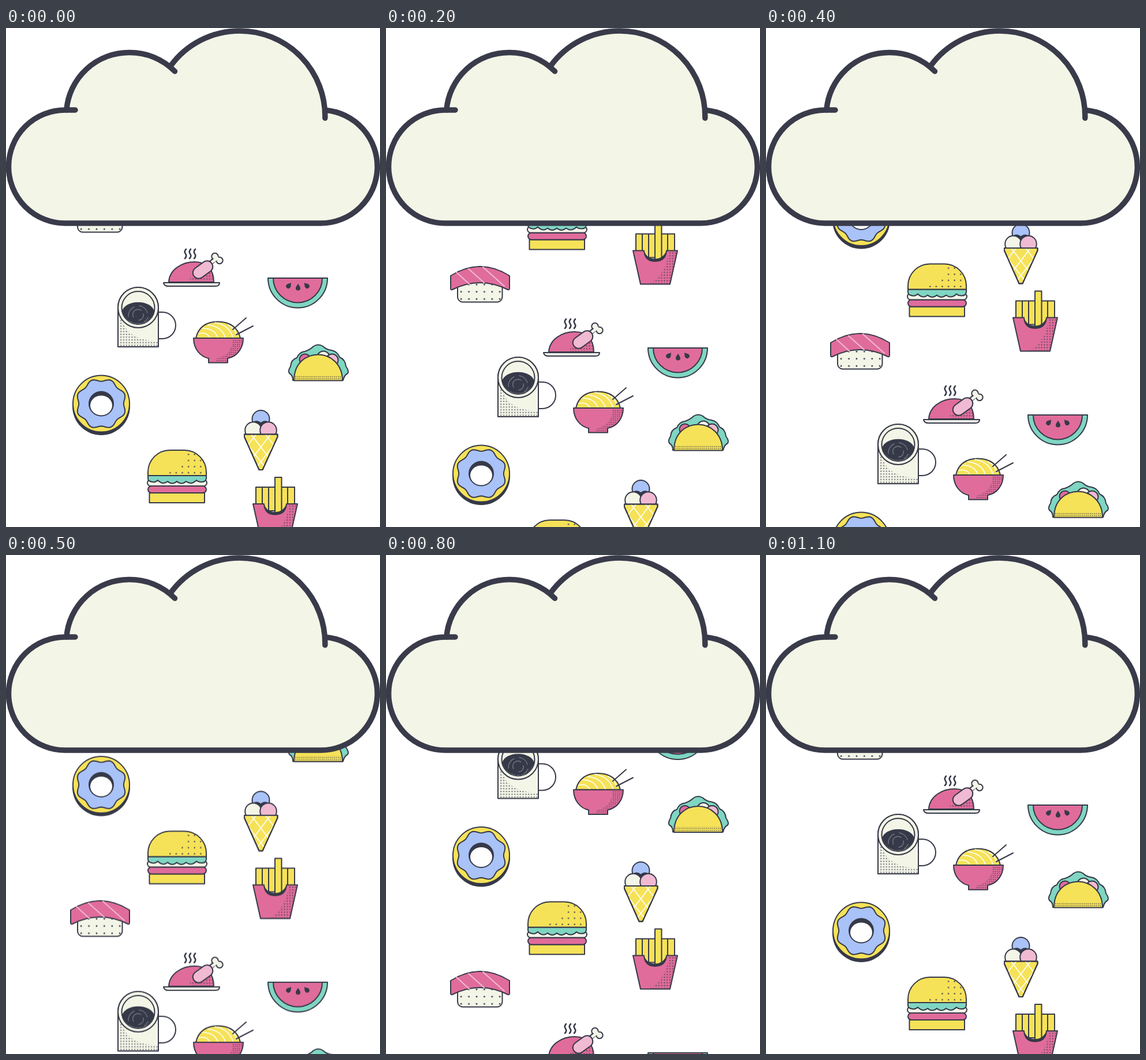
Animation of 648x864 px, one loop 1200 ms. Source, as an HTML page:

```html
<!DOCTYPE html>
<html lang="en">
<head>
<meta charset="utf-8">
<title>Food rain</title>
<style>
  html, body { margin: 0; width: 100%; height: 100%; overflow: hidden; background: #fff; }
  svg { display: block; width: 648px; height: 864px; }
  .item { stroke: #363948; stroke-width: 2; stroke-linejoin: round; stroke-linecap: round; fill: none; }
  .pink { fill: #e06c9b; }
  .rose { fill: #f0bad2; }
  .yellow { fill: #f6e258; }
  .mint { fill: #7fd6c2; }
  .blue { fill: #a9c2f8; }
  .cream { fill: #f3f5e7; }
  .ink { fill: #363948; }
  .white { stroke: #fff; stroke-width: 1.6; }
  .stripe { stroke: #f0bad2; }
  .swirl { stroke: #737582; stroke-width: 1.4; }
  .steam { stroke-width: 2.6; }
  .bone { stroke-width: 8; }
  .marrow { stroke: #f3f5e7; stroke-width: 5; }
  .bare { stroke: none; }
  .fine { fill: url(#fine); stroke: none; }
  .small { fill: url(#small); stroke: none; }
  #rain { animation: fall 1.2s step-end infinite; }
  @keyframes fall {
    0% { transform: translateY(0); }
    8.33% { transform: translateY(74px); }
    16.66% { transform: translateY(121px); }
    25% { transform: translateY(168.7px); }
    33.33% { transform: translateY(237px); }
    41.66% { transform: translateY(306.7px); }
    50% { transform: translateY(342px); }
    58.33% { transform: translateY(377.5px); }
    66.66% { transform: translateY(429px); }
    75% { transform: translateY(481.3px); }
    83.33% { transform: translateY(520px); }
    91.66%, 100% { transform: translateY(0); }
  }
</style>
</head>
<body>
<svg viewBox="0 0 648 864">
  <defs>
    <clipPath id="below"><rect y="240" width="648" height="624"/></clipPath>
    <pattern id="fine" width="3.5" height="3.5" patternUnits="userSpaceOnUse">
      <circle class="ink" cx="1.75" cy="1.75" r=".8"/>
    </pattern>
    <pattern id="small" width="4.8" height="4.8" patternUnits="userSpaceOnUse">
      <circle class="ink" cx="2.4" cy="2.4" r="1"/>
    </pattern>
    <pattern id="seeds" x="279" y="733" width="10.6" height="10.6" patternUnits="userSpaceOnUse">
      <circle class="ink" cx="5.3" cy="5.3" r="1.2"/>
    </pattern>
    <pattern id="grains" x="123.5" y="391" width="13.4" height="12.5" patternUnits="userSpaceOnUse">
      <circle class="ink" cx="6.7" cy="6.2" r="1.4"/>
    </pattern>
    <path id="seed" d="M0-6C1-3 4-1 4 2A4 4 0 0 1-4 2C-4-1-1-3 0-6Z"/>
    <path id="cone" d="M413 703.5H470.5V708L444.5 765H438.5L413 708Z"/>
    <path id="lattice" d="M425 704L454 742M450 704L463 721M418 721L447 758"/>
  </defs>

  <g clip-path="url(#below)">
    <g id="rain">
      <g id="foods">
        <!-- sushi -->
        <g class="item" transform="translate(0 -74)">
          <rect class="cream" x="124" y="385" width="77.5" height="42.5" rx="9"/>
          <path fill="url(#grains)" class="bare" d="M125 391H201V427H125Z"/>
          <path class="pink" d="M112 382Q163 350 214 382V404Q214 407 211 406Q163 382 115 406Q112 407 112 404Z"/>
          <path class="stripe" d="M122 376L145 397M143 370L170 394M168 367L205 400"/>
        </g>

        <!-- roast -->
        <g class="item">
          <path class="pink" d="M282 440C283 418 305 405 327 405C350 405 360 420 360 440Z"/>
          <path class="small" d="M353 419L358 430V439H319V433L340 430Z"/>
          <path class="cream" d="M273 441H370Q370 447 363 447H281Q274 447 273 441Z"/>
          <path class="bone" d="M352 409L362 400"/>
          <circle class="cream" cx="362" cy="395.5" r="5.7"/>
          <circle class="cream" cx="370" cy="402.5" r="5.7"/>
          <path class="marrow" d="M352 409L366 398.5"/>
          <rect class="rose" x="322" y="408.5" width="38" height="20" rx="10" transform="rotate(-36 341 418.5)"/>
          <path class="steam" d="M312 383q-4 4-1 8t-1 8M320 383q-4 4-1 8t-1 8M328 383q-4 4-1 8t-1 8"/>
        </g>

        <!-- watermelon -->
        <g class="item">
          <path class="mint" d="M454 433H557A51.5 51.5 0 0 1 454 433Z"/>
          <path class="pink" d="M463 433H548A42.5 42.5 0 0 1 463 433Z"/>
          <g class="ink bare">
            <use href="#seed" transform="translate(490.5 445.5) rotate(40)"/>
            <use href="#seed" transform="translate(506 448.5)"/>
            <use href="#seed" transform="translate(520.5 445.5) rotate(-40)"/>
          </g>
        </g>

        <!-- coffee -->
        <g class="item">
          <path d="M264 492H271A23 23 0 0 1 271 538H264"/>
          <path class="cream" d="M194 552V484A35 35 0 0 1 264 484V552Z"/>
          <path class="small" d="M196 499H200Q206 541 263 542V551H196Z"/>
          <circle class="cream" cx="229" cy="484" r="35"/>
          <circle class="cream" cx="229" cy="484.5" r="28.5"/>
          <path class="ink bare" d="M201.3 490A28 18 0 0 1 256.7 490A28.5 28.5 0 0 1 201.3 490Z"/>
          <path class="swirl" d="M221 501A9 9 0 0 1 234 489M238 495A9 9 0 0 1 230 506M212 500A17 17 0 0 1 222 483M231 481A17 17 0 0 1 245 493M246 501A17 17 0 0 1 240 508"/>
        </g>

        <!-- noodles -->
        <g class="item">
          <path class="yellow" d="M329 537C333 518 347 508.5 367 508.5S402 518 406 537Z"/>
          <path class="white" d="M334 529Q348 526 353 536M341 520Q361 520 367 536M350 514Q374 517 380 536M362 510Q386 514 393 535M385 514Q397 520 400 532"/>
          <path d="M393 522L416 502M399 531L428 516"/>
          <path class="pink" d="M325 537H411C411 556 399 569 384 572V579.5H351V572C337 569 325 556 325 537Z"/>
          <path class="fine" d="M393 539H409C408 556 397 567 383 571V578H364V573Q392 566 393 539Z"/>
        </g>

        <!-- taco -->
        <g class="item">
          <path class="mint" d="M497 610Q497 601 491 598Q488 594 493 586Q494 574 504 571Q508 561 518 560Q527 557 533 551Q541 546 549 551Q555 557 564 558Q574 560 578 570Q588 574 589 586Q595 594 592 598Q586 601 584 610Z"/>
          <circle class="pink" cx="518" cy="574" r="9.5"/>
          <circle class="cream" cx="550" cy="570.5" r="11"/>
          <circle class="rose" cx="565" cy="575" r="10.5"/>
          <path class="yellow" d="M499 610.5C499 580 520 565.5 541 565.5S583 582 583 610.5Z"/>
          <path class="fine" d="M501 601H581V609.5H501Z"/>
        </g>

        <!-- donut -->
        <g class="item">
          <circle class="ink bare" cx="165" cy="655" r="50"/>
          <circle class="yellow" cx="165" cy="650.5" r="49"/>
          <path id="icing" class="blue"/>
          <circle class="ink bare" cx="165" cy="650.5" r="22"/>
          <ellipse fill="#fff" class="bare" cx="165" cy="653.5" rx="19" ry="17"/>
        </g>

        <!-- ice cream -->
        <g class="item">
          <circle class="blue" cx="441.5" cy="677" r="15"/>
          <path class="ink bare" d="M427 683Q434 677 441.5 683Q449 677 456 683L441.5 697Z"/>
          <circle class="cream" cx="428.5" cy="696.5" r="14.3"/>
          <circle class="rose" cx="454.5" cy="696.5" r="14.3"/>
          <use href="#cone" class="yellow"/>
          <g class="white">
            <use href="#lattice"/>
            <use href="#lattice" transform="matrix(-1 0 0 1 883 0)"/>
          </g>
          <use href="#cone"/>
        </g>

        <!-- burger -->
        <g class="item">
          <rect class="yellow" x="248.5" y="805" width="95.5" height="17"/>
          <rect class="pink" x="246" y="793" width="101" height="12" rx="6"/>
          <rect class="cream" x="245" y="782" width="103" height="11" rx="5.5"/>
          <path class="mint" d="M246 775H347V780Q346 786 339 786Q333 786 330 783Q321 792 312 785Q304 792 296 785Q288 792 280 785Q272 792 263 783Q259 787 254 786Q246 785 246 780Z"/>
          <path class="yellow" d="M246 775V769A38 38 0 0 1 284 731H309A38 38 0 0 1 347 769V775Z"/>
          <path fill="url(#seeds)" class="bare" d="M279 764H300V754H311V733H332V743H343V775H279Z"/>
        </g>

        <!-- fries -->
        <g class="item">
          <path class="yellow" d="M433 795H500V836H433ZM444 795V836M455 795V836M488 795V836"/>
          <path class="yellow" d="M466 778H477.5V840H466Z"/>
          <path class="ink bare" d="M447 824Q449 844 466 844Q484 844 486 824Q480 838 466 838Q452 838 447 824Z"/>
          <path class="pink" d="M428 824H447C448 837 455 842.5 466 842.5S485 837 486 824H505L492 882H441Z"/>
          <path class="small" d="M490 826H503L491 881H457Q485 865 490 826Z"/>
        </g>
      </g>
      <use href="#foods" y="-559.5"/>
    </g>
  </g>

  <!-- cloud -->
  <g fill="#f3f5e7" stroke="#3a3b4a" stroke-width="9.5" stroke-linecap="round">
    <path stroke="none" d="M102.5 142H105A108.5 108.5 0 0 1 213 42.5A108.5 108.5 0 0 1 285 70A148 148 0 0 1 553 142A98 98 0 0 1 545.5 338H102.5A98 98 0 0 1 102.5 142Z"/>
    <path fill="none" d="M120 142H102.5A98 98 0 0 0 102.5 338H545.5A98 98 0 0 0 553 142.3"/>
    <path fill="none" d="M104.8 142A108.5 108.5 0 0 1 213 42.5A108.5 108.5 0 0 1 292.5 75"/>
    <path fill="none" d="M285 66A148 148 0 0 1 405 5A148 148 0 0 1 552.8 156"/>
  </g>
</svg>
<script>
  // Eight soft waves around the icing.
  const steps = 96;
  const points = Array.from({ length: steps }, (_, i) => {
    const angle = i / steps * 2 * Math.PI;
    const r = 41.3 - 2.5 * Math.cos(8 * angle);
    return `${(165 + r * Math.cos(angle)).toFixed(2)} ${(650.5 + r * Math.sin(angle)).toFixed(2)}`;
  });
  document.getElementById('icing').setAttribute('d', `M${points.join('L')}Z`);
</script>
</body>
</html>
```
